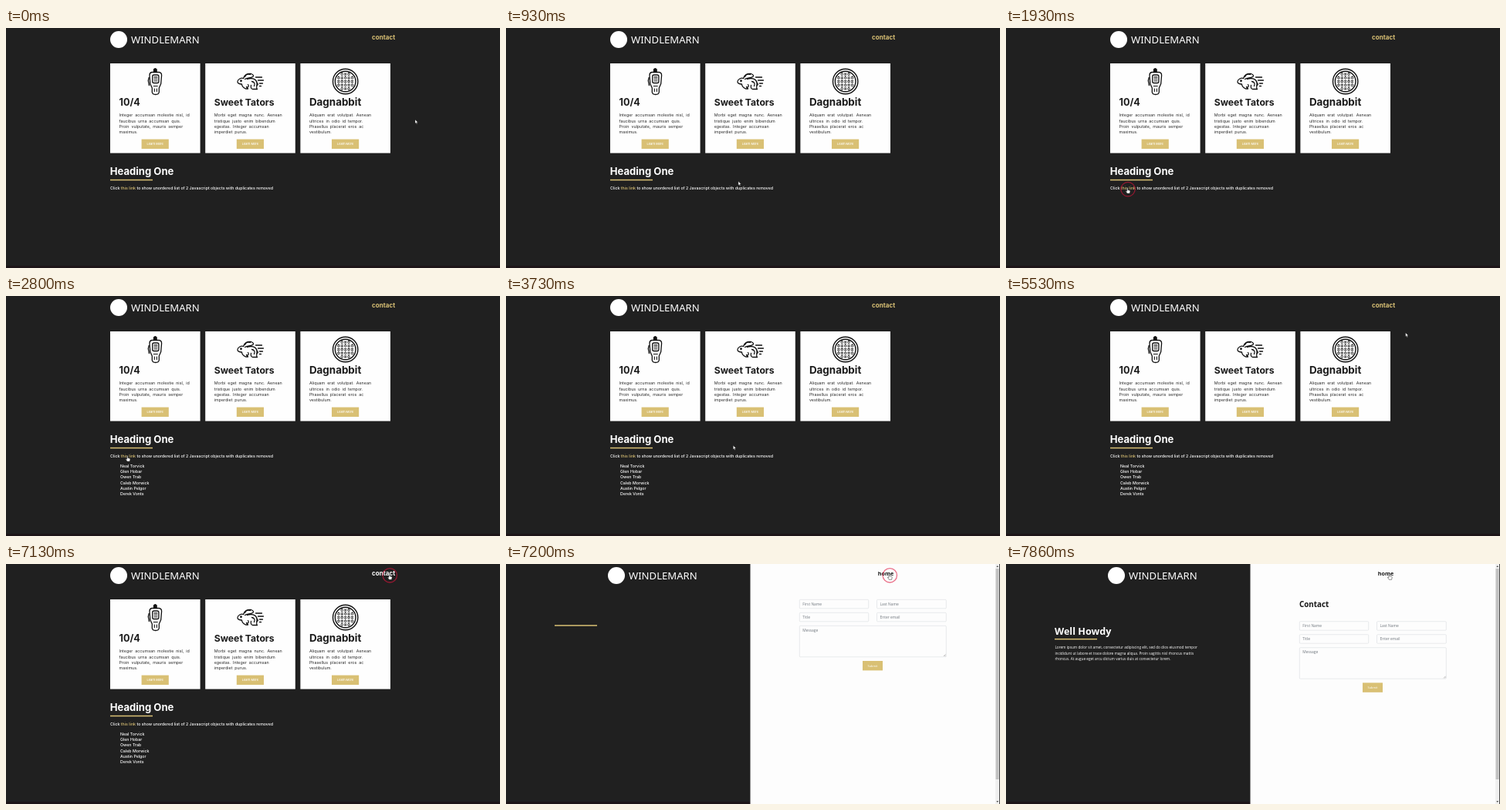
Write an HTML page that moves like this. It is 640 px wide and 312 px high and loops after 8 s.

```html
<!DOCTYPE html>
<html lang="en">
<head>
<meta charset="utf-8">
<title>Landing and contact pages</title>
<style>
html, body { margin: 0; width: 100%; height: 100%; overflow: hidden; background: #202020; }
svg { display: block; width: 100%; height: 100%; }
text { font-family: Inter, sans-serif; white-space: pre; }
.alt text { font-family: "Open Sans", "Noto Sans", sans-serif; }
text.brand { font-family: "Noto Sans", sans-serif; }
.icon { fill: none; stroke: #111; stroke-width: 1.3; stroke-linecap: round; stroke-linejoin: round; }
</style>
</head>
<body>
<svg id="stage" viewBox="0 0 640 312"></svg>
<script>
const LOOP = 8000, LIST_AT = 2660, PAGE_AT = 7190, CONTENT_AT = 7320;
const GOLD = '#d9c074', DARK = '#202020', STRIP = '#1d1518', PAPER = '#fdfdfd';

const rect = (x, y, w, h, fill, more = '') =>
  `<rect x="${x}" y="${y}" width="${w}" height="${h}" fill="${fill}" ${more}/>`;
const text = (x, y, size, str, fill = '#fff', weight = 400, more = '') =>
  `<text x="${x}" y="${y}" font-size="${size}" fill="${fill}" font-weight="${weight}" ${more}>${str}</text>`;
const lines = (x, y, step, size, rows, ...style) =>
  rows.map((row, i) => text(x, y + i * step, size, row, ...style)).join('');
const brand = x =>
  `<circle cx="${x}" cy="15" r="11" fill="#fff"/>` +
  text(x + 16, 19.8, 13.1, 'WINDLEMARN', '#fff', 500, 'class="brand"');
const button = (x, y, w, h, label) =>
  rect(x, y, w, h, GOLD) +
  text(x + w / 2, y + h / 2 + 1.4, 3.9, label, '#fff', 500, 'text-anchor="middle"');

const micIcon = `
  <path d="M-1.8 -12V-15.5Q0 -18 1.8 -15.5V-12" fill="#111"/>
  <path d="M-4.5 -12H5Q8.3 -11.5 8.3 -8L7.4 3L5 8.5V14Q4.5 17 .5 17Q-3.5 17 -4 14V8.5L-6.5 3L-7.3 -8Q-7.3 -11.5 -4.5 -12Z"/>
  <path d="M-8.2 -5L-9 -1L-7.8 5"/>
  <rect x="-3.6" y="-8.5" width="8.2" height="10.5" rx="2"/>
  <path d="M-1.4 -5.6H2.6M-1.4 -3.2H2.6M-1.4 -.8H2.6M-2 6H3M-1 9.5V13M2 9.5V13" stroke-width="1.1"/>`;

const rabbitIcon = `
  <path d="M-9 -4C-12 -5 -16 -3 -16.5 0C-16.8 2.5 -14 3.5 -11 3.5C-11 6 -9 8 -6 9.5H-3L-5 7"/>
  <path d="M-9 -4C-8 -8 -4 -11 1 -10C4 -9 5 -7 3 -6C0 -4 -4 -5 -7 -3"/>
  <path d="M-7 -6C-6 -9 -3 -10 0 -9"/>
  <path d="M-4 -3C1 -5 7 -4 8.5 1C9 5 7 8 9 10H3Q0 9 1 5M-3 4Q-1 7 -4 7.5"/>
  <path d="M2 0Q7 1 5 6M8.5 2Q11 3 9 5"/>
  <path d="M7 -5.5H15M10 -1.5H17M12 2.5H16M12 6H14"/>
  <circle cx="-12" cy="-.8" r=".7" fill="#111"/>`;

function grateIcon() {
  let out = '<circle r="16.2" stroke-width="1.4"/><circle r="13.3" stroke-width="1.4"/>';
  for (let col = -2; col <= 2; col++) {
    for (let row = -2; row <= 2; row++) {
      const x = col * 4.4, y = row * 4.7;
      if (Math.hypot(x, y) > 11.4) continue;
      out += (col + row) % 2
        ? `<rect x="${x - 1.1}" y="${y - 1.6}" width="2.2" height="3.2" rx="1" stroke-width=".9"/>`
        : `<path d="M${x - 1.2} ${y - .9}h2.4m-2.4 1.8h2.4" stroke-width="1"/>`;
    }
  }
  return out;
}

const cards = [
  { title: '10/4', size: 12.6, icon: micIcon, body: ['Integer accumsan molestie nisl, id',
    'faucibus urna accumsan quis.', 'Proin vulputate, mauris semper', 'maximus.'] },
  { title: 'Sweet Tators', size: 12.2, icon: rabbitIcon, body: ['Morbi eget magna nunc. Aenean',
    'tristique justo enim bibendum', 'egestas. Integer accumsan', 'imperdiet purus.'] },
  { title: 'Dagnabbit', size: 13.4, icon: grateIcon(), body: ['Aliquam erat volutpat. Aenean',
    'ultrices in odio id tempor.', 'Phasellus placerat eros ac', 'vestibulum.'] }
];
const people = ['Neal Torvick', 'Glen Hobar', 'Owen Trab', 'Caleb Morwick', 'Austin Pelgor', 'Derek Vonts'];

const card = ({ title, size, icon, body }, i) => {
  const x = 135 + i * 123.2;
  return rect(x, 46, 116.6, 116.6, '#fefefe') +
    `<g class="icon" transform="translate(${x + 58.3} 69.5)">${icon}</g>` +
    text(x + 11.5, 101.4, size, title, '#1c1c1c', 700) +
    lines(x + 11.5, 115.4, 7.3, 5.35, body, '#2a2a2a', 400, 'word-spacing="1.4"') +
    button(x + 40.6, 144.6, 35.2, 12.5, 'Learn More');
};

const homePage = `<g id="home">
  ${rect(0, 0, 640, 312, DARK)}${rect(0, 309, 640, 3, STRIP)}
  ${brand(146)}
  ${text(474, 14.6, 8.1, 'contact', GOLD, 700, 'id="nav"')}
  ${cards.map(card).join('')}
  ${text(134.7, 191, 13.1, 'Heading One', '#fff', 700)}
  ${rect(135, 196.8, 55, 1.5, GOLD)}
  ${text(135, 210.1, 5.24, `Click <tspan fill="${GOLD}">this link</tspan> to show unordered list of 2 Javascript objects with duplicates removed`, '#fff', 500)}
  <g id="list">${lines(148, 222.5, 7.34, 5.25, people, '#fff', 500)}</g>
</g>`;

const field = (x, y, w, h, label) =>
  rect(x, y, w, h, PAPER, 'rx="1" stroke="#d9dce0" stroke-width=".6"') +
  text(x + 4, y + 7.6, 4.9, label, '#70777e');

const contactPage = `<g id="contact" class="alt">
  ${rect(0, 0, 317, 312, DARK)}${rect(0, 309, 317, 3, STRIP)}
  ${rect(316.5, 0, 323.5, 312, PAPER)}
  ${brand(143)}
  ${text(481.8, 15, 7.2, 'home', '#161616', 700)}
  <g id="loaded">
    ${text(63, 92, 12.6, 'Well Howdy', '#fff', 700)}
    ${lines(63.4, 110.4, 7.4, 4.7, [
      'Lorem ipsum dolor sit amet, consectetur adipiscing elit, sed do dios eiusmod tempor',
      'incididunt ut labore et trace dolore magna aliqua. Proin sagittis nisl rhoncus mattis',
      'rhoncus. At augue eget arcu dictum varius duis at consectetur lorem.'], '#fff', 500)}
    ${text(380, 56, 9.8, 'Contact', '#161616', 700)}
  </g>
  <g id="rule">${rect(63, 79.2, 55, 1.5, GOLD)}</g>
  <g id="form">
    ${field(380.3, 46.3, 89.4, 11.5, 'First Name')}${field(480.5, 46.3, 89.8, 11.5, 'Last Name')}
    ${field(380.3, 63.3, 89.4, 11.5, 'Title')}${field(480.5, 63.3, 89.8, 11.5, 'Enter email')}
    ${field(380.3, 80.3, 190, 40.5, 'Message')}
    <path d="M567 120l2.6-2.6M568.6 120l1-1" stroke="#777" stroke-width=".5"/>
    ${button(462, 126, 26, 12.4, 'Submit')}
  </g>
  ${rect(634, 0, 5.3, 312, '#f0f0f0')}${rect(634.5, 6, 4.2, 274, '#c2c2c2')}
  ${rect(639.2, 0, .8, 312, DARK)}
  <path d="M635.3 4l1.4-2 1.4 2zM635.3 308l1.4 2 1.4-2z" fill="#555"/>
</g>`;

const pointer = `
  <circle id="ring" r="9.2" fill="none" stroke="#de143c" stroke-width="1.3" opacity=".6"/>
  <path id="arrow" d="M0 0V5.2L1.2 4.1L2 6L2.9 5.6L2.1 3.8H3.7Z" fill="#fff" stroke="#111" stroke-width=".4"/>
  <path id="hand" d="M-1.3 -3.4Q-.7 -4.2 -.1 -3.4V-.9L2.4 -.3Q3 0 2.9 .8L2.3 3.6H-1L-2.8 .8Q-2.8 -.2 -1.3 .8Z"
    fill="#fff" stroke="#222" stroke-width=".5"/>`;

document.getElementById('stage').innerHTML =
  homePage + contactPage + `<g id="pointer">${pointer}</g>`;
const el = Object.fromEntries([...document.querySelectorAll('#stage [id]')].map(n => [n.id, n]));

// time, x, y
const path = [
  [0, 530, 119], [150, 530, 119], [860, 310, 198], [1300, 180, 217], [1700, 158, 211.5],
  [2950, 158, 211.5], [3730, 294.3, 194.3], [4360, 232, 267], [5200, 497, 72],
  [5530, 517.6, 47.7], [6060, 497.3, 16.7], [8000, 497.3, 16.7]
];

function pointerAt(t) {
  const i = path.findIndex((p, k) => k && t <= p[0]);
  const [t0, x0, y0] = path[i - 1], [t1, x1, y1] = path[i];
  const u = (t - t0) / (t1 - t0), e = u * u * (3 - 2 * u);
  return [x0 + (x1 - x0) * e, y0 + (y1 - y0) * e];
}

const show = (node, on) => node.setAttribute('display', on ? 'inline' : 'none');
const within = (t, a, b) => t >= a && t < b;

function draw(t) {
  const [x, y] = pointerAt(t);
  const onNav = t >= 5990, onLink = within(t, 1560, 3020);
  const loaded = t >= CONTENT_AT;

  show(el.home, t < PAGE_AT);
  show(el.contact, t >= PAGE_AT);
  show(el.list, t >= LIST_AT);
  show(el.loaded, loaded);
  el.nav.setAttribute('fill', onNav ? '#fff' : GOLD);
  el.rule.setAttribute('transform', `translate(0 ${loaded ? 17.7 : 0})`);
  el.form.setAttribute('transform', `translate(0 ${loaded ? 28.4 : 0})`);

  el.pointer.setAttribute('transform', `translate(${x} ${y})`);
  show(el.hand, onNav || onLink);
  show(el.arrow, !onNav && !onLink);
  show(el.ring, within(t, 1860, 2330) || within(t, 6800, 7390));
  el.ring.setAttribute('cy', -1.9);
}

const start = performance.now();
function tick() {
  draw((performance.now() - start) % LOOP);
  requestAnimationFrame(tick);
}
tick();
</script>
</body>
</html>
```
